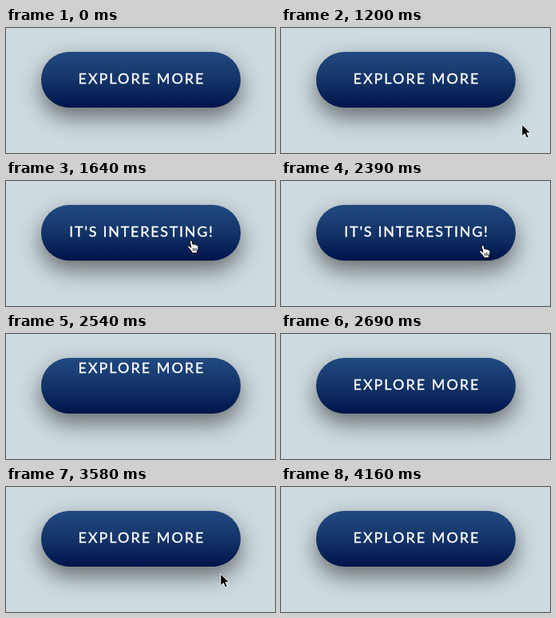
Recreate the animation shown at these times as an HTML page. Size 337 by 157 pixels, loop 4310 ms.

```html
<!DOCTYPE html>
<html lang="en">
<head>
<meta charset="utf-8">
<title>Button hover</title>
<style>
html, body { margin: 0; width: 100%; height: 100%; overflow: hidden; background: #cddadf; }
svg { display: block; width: 337px; height: 157px; }
text {
  font: 400 18px Lato, sans-serif;
  text-anchor: middle;
  fill: #fff; stroke: #fff; stroke-width: .35px;
}
#idle { letter-spacing: 2px; }
#hover { letter-spacing: 1.7px; }
</style>
</head>
<body>
<svg viewBox="0 0 337 157">
  <defs>
    <linearGradient id="blue" x1="0" y1="0" x2="0" y2="1">
      <stop offset="0" stop-color="#214a80"/>
      <stop offset=".5" stop-color="#143468"/>
      <stop offset="1" stop-color="#00134a"/>
    </linearGradient>
    <filter id="blur" filterUnits="userSpaceOnUse" x="-30" y="-30" width="400" height="240" color-interpolation-filters="sRGB">
      <feGaussianBlur stdDeviation="14"/>
    </filter>
    <clipPath id="pill"><rect x="44" y="30" width="250" height="70" rx="35"/></clipPath>
  </defs>
  <rect width="337" height="157" fill="#cddadf"/>
  <rect x="44" y="42" width="250" height="70" rx="35" fill-opacity=".5" filter="url(#blur)"/>
  <rect x="44" y="30" width="250" height="70" rx="35" fill="url(#blue)"/>
  <g clip-path="url(#pill)">
    <text id="idle" x="170" y="69.8">EXPLORE MORE</text>
    <text id="hover" x="170" y="69.8">IT'S INTERESTING!</text>
  </g>
  <g id="arrow">
    <path d="M.8 1.2V16L4.3 12.8L6.6 18.2L9.3 17.1L7 11.8H11.8Z" fill="#000" stroke="#fff"/>
  </g>
  <g id="hand" stroke="#000" stroke-linejoin="round" stroke-linecap="round">
    <path d="M3.3 2.1Q3.1 .6 4.5 .6Q5.8 .6 6.2 2.2L7 5.6Q8.6 4.6 9.4 6Q10.8 5.2 11.6 6.7Q13.4 6 13.9 8Q14.6 11 12.6 13.7V16.3H6.2Q5.6 14.2 4 12.6L1 9.3Q.2 8 1.4 7.4Q2.6 7 4.7 9.2Z" fill="#fff"/>
    <path d="M7.4 10.5V13.6M9.3 10.5V13.6M11.2 10.5V13.6" stroke-width=".8"/>
  </g>
</svg>
<script>
const LOOP = 4310;

// [start ms, cursor, x, y]
const pointer = [
  [0],
  [1200, 'arrow', 301, 120],
  [1350, 'arrow', 258, 100],
  [1490, 'hand', 235, 83],
  [1640, 'hand', 227, 74],
  [2390, 'hand', 248, 80],
  [2540],
  [3280, 'arrow', 310, 132],
  [3430, 'arrow', 310.5, 132.5],
  [3580, 'arrow', 268, 108],
  [3730, 'arrow', 271.5, 108],
  [3870, 'arrow', 277, 112],
  [4020, 'arrow', 313, 152],
  [4160]
];

// [start ms, label, vertical offset]
const labels = [
  [0, 'idle', 0],
  [1490, 'hover', 14],
  [1640, 'hover', 0],
  [2540, 'idle', -21],
  [2690, 'idle', 0]
];

const el = id => document.getElementById(id);
const at = (steps, t) => steps.filter(s => s[0] <= t).pop();

function place(id, shown, x, y) {
  el(id).setAttribute('visibility', shown ? 'visible' : 'hidden');
  if (shown) el(id).setAttribute('transform', `translate(${x} ${y})`);
}

function draw(t) {
  const [, cursor, x, y] = at(pointer, t);
  const [, label, dy] = at(labels, t);
  for (const id of ['arrow', 'hand']) place(id, id === cursor, x, y);
  for (const id of ['idle', 'hover']) place(id, id === label, 0, dy);
}

const start = performance.now();
function tick() {
  draw((performance.now() - start) % LOOP);
  requestAnimationFrame(tick);
}
tick();
</script>
</body>
</html>
```
